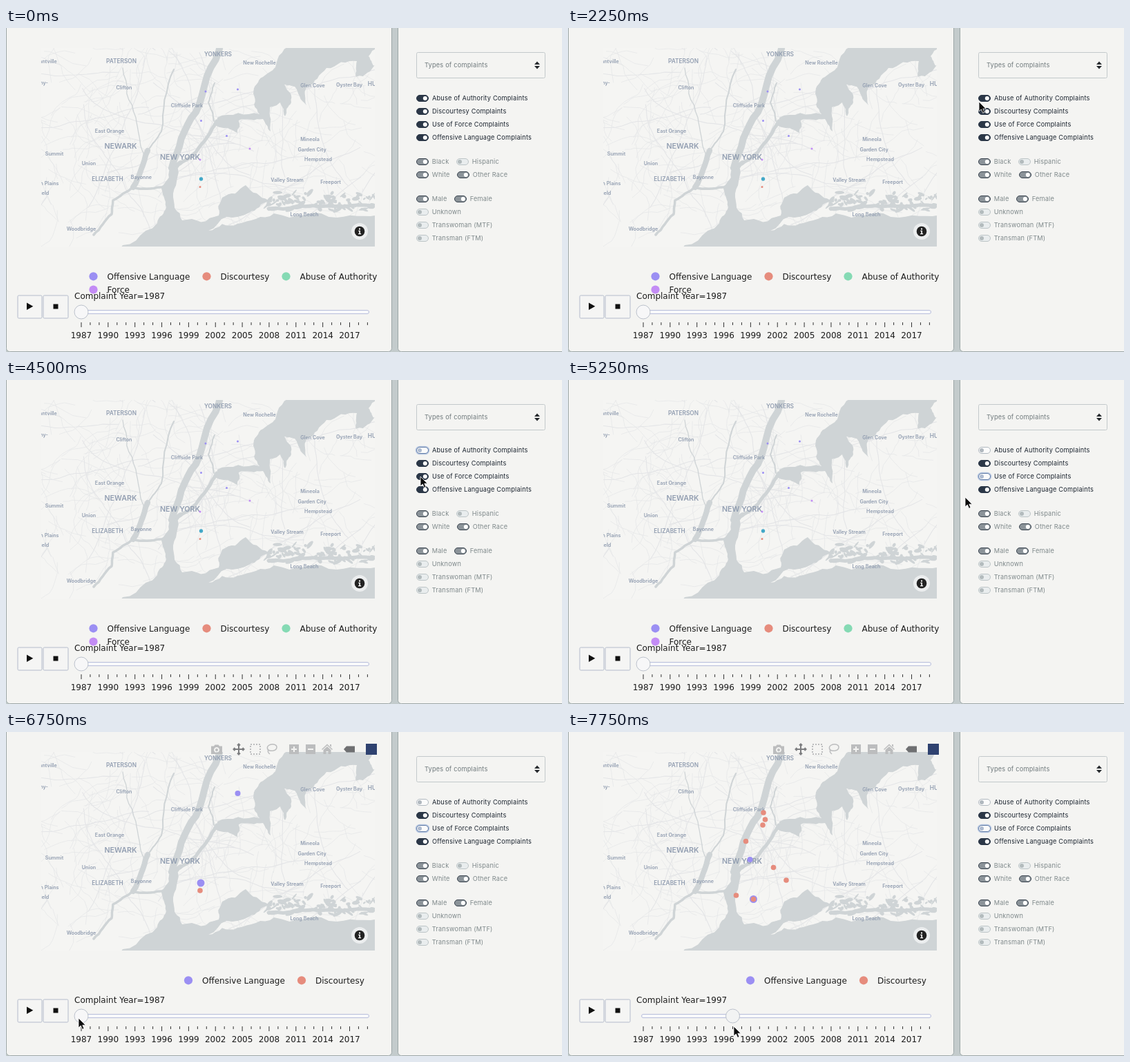
These frames come from a looping animation (805x470 px, 8000 ms). An HTML page:

```html
<!DOCTYPE html>
<html lang="en">
<head>
<meta charset="utf-8">
<title>Complaints by year</title>
<style>
  html, body { margin: 0; width: 100%; height: 100%; overflow: hidden; background: #c3cbcc; }
  svg { display: block; width: 805px; height: 470px; }
  .plot { font: 12px "DejaVu Sans", sans-serif; fill: #1c1c1c; }
  .form { font: 9.2px Inter, sans-serif; letter-spacing: .2px; }
  .places { font-family: Inter, sans-serif; font-weight: 600; fill: #929eb1; text-anchor: middle; }
  .water { fill: #cfd4d6; }
  .river { fill: none; stroke: #cfd4d6; stroke-linejoin: round; stroke-linecap: round; }
  .road { fill: none; stroke: #e4e5e7; }
</style>
</head>
<body>
<svg viewBox="0 0 805 470" xmlns="http://www.w3.org/2000/svg">
  <defs><clipPath id="mapClip"><rect x="51" y="29" width="483" height="288"/></clipPath></defs>
  <g fill="#f4f4f2" stroke="#9ca6a7">
    <rect x=".5" y="-9.5" width="558" height="479" rx="5"/>
    <rect x="567.5" y="-9.5" width="260" height="479" rx="5"/>
  </g>
  <g id="map" clip-path="url(#mapClip)"></g>
  <g id="controls"></g>
  <g id="live"></g>
</svg>
<script>
const $ = id => document.getElementById(id);

let seed = 11;
const random = () => (seed = (seed * 16807) % 2147483647) / 2147483647;
const between = (low, high) => low + random() * (high - low);
const repeat = (count, draw) => Array.from({ length: count }, (_, i) => draw(i)).join("");

const circle = (x, y, r, fill, extra = "") => `<circle cx="${x}" cy="${y}" r="${r}" fill="${fill}" ${extra}/>`;
const path = (d, attrs) => `<path d="${d}" ${attrs}/>`;
const text = (x, y, label, attrs = "") => `<text x="${x}" y="${y}" ${attrs}>${label}</text>`;

// ---------- map ----------
const OCEAN = `150,330 214,283 227,260 219,230 235,200 249,192 237,240 250,279 303,272 308,246
  342,228 375,250 347,268 288,294 330,284 383,269 474,275 550,262 550,330`;
const SOUND = `412,20 385,57 367,71 353,95 362,125 301,130 297,140 316,145 330,152 332,134 367,132 378,150
  377,115 392,108 399,128 408,108 398,82 413,85 430,112 430,86 459,58 503,48 502,71 512,70 528,55 520,41 550,20`;
const RIVERS = {
  "306,20 270,122 235,203": 10,
  "300,135 270,180 247,197": 5,
  "296,135 288,108 297,80": 2,
  "200,178 179,231": 8,
  "219,231 179,231 150,250 148,270 122,300": 3.5,
  "200,178 220,150 238,60": 2,
  "195,184 183,130 164,58": 1.3,
  "375,262 460,258 550,255": 5
};
const PLACES = [
  ["PATERSON", 167, 48], ["YONKERS", 307, 38], ["New Rochelle", 367, 51], ["antville", 61, 49],
  ["ny-", 55, 80], ["Clifton", 171, 87], ["Cliffside Park", 262, 113], ["Glen Cove", 444, 84],
  ["Oyster Bay", 497, 83], ["HU", 530, 81], ["East Orange", 150, 150], ["NEWARK", 166, 171],
  ["Mineola", 440, 162], ["Garden City", 443, 177], ["Hempstead", 452, 191], ["Summit", 70, 183],
  ["Union", 120, 197], ["NEW YORK", 252, 187], ["ELIZABETH", 147, 219], ["Bayonne", 196, 217],
  ["Valley Stream", 407, 221], ["Freeport", 470, 224], ["h Plains", 63, 226], ["ield", 56, 240],
  ["Woodbridge", 109, 292], ["Long Beach", 432, 271]
];

const parse = points => points.trim().split(/\s+/).map(pair => pair.split(",").map(Number));

// Midpoint displacement turns a few key points into a ragged shore.
function ragged(points, roughness) {
  const split = ([x0, y0], [x1, y1], depth) => {
    if (!depth) return `L${x1.toFixed(1)} ${y1.toFixed(1)}`;
    const shift = between(-roughness, roughness);
    const middle = [(x0 + x1) / 2 + (y1 - y0) * shift, (y0 + y1) / 2 - (x1 - x0) * shift];
    return split([x0, y0], middle, depth - 1) + split(middle, [x1, y1], depth - 1);
  };
  return "M" + points[0] + points.slice(1).map((point, i) => split(points[i], point, 3)).join("");
}

// A wandering line: each short stretch turns a little from the one before.
function road(stretches, turn) {
  let angle = between(0, Math.PI * 2);
  return `M${between(45, 535)} ${between(25, 290)}` + repeat(stretches, () => {
    angle += between(-turn, turn);
    const length = between(5, 16);
    return `l${(Math.cos(angle) * length).toFixed(1)} ${(Math.sin(angle) * length).toFixed(1)}`;
  });
}

function marshPool() {
  const x = between(370, 535), y = between(238, 264);
  return `<ellipse cx="${x}" cy="${y}" rx="${between(2, 7)}" ry="${between(1, 3)}" class="water"
    transform="rotate(${between(-60, 60)} ${x} ${y})"/>`;
}

function placeLabel([name, x, y]) {
  const size = name.startsWith("NEW") ? 10.7 : name === name.toUpperCase() ? 8.3 : 7.2;
  return text(x, y + size * .34, name, `font-size="${size}"`);
}

$("map").innerHTML =
  `<rect x="51" y="29" width="483" height="288" fill="#f5f5f3"/>` +
  path(repeat(260, () => road(6, .5)), `class="road" stroke-width=".7"`) +
  path(repeat(22, () => road(22, .25)), `class="road" stroke-width="1.1"`) +
  `<g transform="translate(5 0)">` +
  [OCEAN, SOUND].map(shore => path(ragged(parse(shore), .13), `class="water"`)).join("") +
  Object.entries(RIVERS).map(([course, width]) =>
    path(ragged(parse(course), .06), `class="river" stroke-width="${width}"`)).join("") +
  repeat(90, marshPool) + `</g>` +
  `<g class="places">${PLACES.map(placeLabel).join("")}</g>` +
  circle(512, 295, 12, "#fff", `opacity=".6"`) + circle(512, 295, 7.3, "#222") +
  path("M510.3 293.8h2.6v4.2h1.2v1.2h-4v-1.2h1.2v-3h-1zM511 290.4h2v2h-2z", `fill="#fff"`);

// ---------- fixed controls ----------
const FIRST_YEAR = 1987;
const yearX = year => 109 + (year - FIRST_YEAR) * 12.95;

const SWITCH = {
  on:          { fill: "#2b3747", border: "#2b3747", knob: "#fff", x: 12.8 },
  off:         { fill: "#fbfbfb", border: "#b0b8bf", knob: "#b0b8bf", x: 5 },
  turning:     { fill: "#b5c3db", border: "#8196b8", knob: "#e6e8e6", x: 8.5, halo: .5 },
  focused:     { fill: "#fbfbfb", border: "#5f7ba6", knob: "#aebbd0", x: 5, halo: 1 },
  disabledOn:  { fill: "#8b9399", border: "#3a444f", knob: "#fff", x: 12.8 },
  disabledOff: { fill: "#e9edee", border: "#bcc4c6", knob: "#b3bbbd", x: 5 }
};

function toggle(x, y, state) {
  const s = SWITCH[state];
  const pill = attrs => `<rect x="${x + .5}" y="${y - 4.5}" width="17" height="9" rx="4.5" ${attrs}/>`;
  return (s.halo ? pill(`fill="none" stroke="#b9c8e2" stroke-width="3.6" opacity="${s.halo}"`) : "") +
    pill(`fill="${s.fill}" stroke="${s.border}"`) + circle(x + s.x, y, 3, s.knob);
}

const rowY = row => 102 + row * 19;
const COMPLAINTS = ["Abuse of Authority", "Discourtesy", "Use of Force", "Offensive Language"];

const filter = (x, y, name, state) =>
  toggle(x, y, state) + text(x + 22.7, y + 3.3, name, `fill="#7f898b"`);
const FILTERS =
  filter(594, 194, "Black", "disabledOn") + filter(652, 194, "Hispanic", "disabledOff") +
  filter(594, 213, "White", "disabledOn") + filter(653, 213, "Other Race", "disabledOn") +
  filter(594, 248, "Male", "disabledOn") + filter(649, 248, "Female", "disabledOn") +
  ["Unknown", "Transwoman (MTF)", "Transman (FTM)"]
    .map((name, i) => filter(594, 267 + i * 19, name, "disabledOff")).join("");

const yearTick = i => {
  const x = yearX(FIRST_YEAR + i), major = i % 3 === 0;
  return path(`M${x} 427V${major ? 434 : 431}`, `stroke="#333"`) +
    (major ? text(x, 450.3, FIRST_YEAR + i, `text-anchor="middle"`) : "");
};

$("controls").innerHTML =
  `<g class="plot"><g fill="#f5f5f4" stroke="#b3bacb">
    <rect x="17" y="388" width="35" height="33" rx="1.5"/><rect x="54" y="388" width="36" height="33" rx="1.5"/></g>
    <path d="M30 398.5V409L39.3 403.7Z" fill="#111"/><rect x="68.5" y="400.5" width="7" height="7" fill="#111"/>
    <rect x="106.5" y="409.5" width="419" height="5" rx="2.5" fill="#f8f9fb" stroke="#b7bddb"/>
    ${repeat(33, yearTick)}</g>
  <g class="form">
    <rect x="594.5" y="35.5" width="186" height="37" rx="2" fill="#f4f4f2" stroke="#c3c9cb"/>
    ${text(606, 57.3, "Types of complaints", `fill="#6f797c"`)}
    <path d="M765 53L769 48.5 773 53ZM765 55L769 59.5 773 55Z" fill="#262a2e"/>
    ${COMPLAINTS.map((name, i) => text(617, rowY(i) + 3.2, name + " Complaints", `fill="#1c2530"`)).join("")}
    ${FILTERS}
  </g>`;

// ---------- legend and dots ----------
const COLOR = { offensive: "#9b8ff3", discourtesy: "#e68c7d", abuse: "#85dab4", force: "#c38cf5" };

const legendItem = (x, y, name, color) => circle(x, y, 6.1, color) + text(x + 20, y + 4.7, name);
const legendRow = x =>
  legendItem(x, 360.3, "Offensive Language", COLOR.offensive) +
  legendItem(x + 164, 360.3, "Discourtesy", COLOR.discourtesy);
const FULL_LEGEND = legendRow(126.5) +
  legendItem(405.5, 360.3, "Abuse of Authority", COLOR.abuse) + legendItem(126.5, 379.5, "Force", COLOR.force);
const SHORT_LEGEND = legendRow(264);

const dots = (points, r, color) => parse(points).map(([x, y]) => circle(x, y, r, color)).join("");
const ALL_DOTS =
  dots("289,92 335.5,89 282.5,134.5 319.5,156.5", 1.5, COLOR.offensive) +
  dots("353,175 281,191", 1.5, COLOR.force) +
  dots("282.5,219", 2.7, "#43a8c8") + dots("281,230.5", 1.5, COLOR.discourtesy);
const FIRST_DOTS =
  dots("335.5,89", 4, COLOR.offensive) + dots("282,219", 5.5, COLOR.offensive) +
  dots("281,230", 3.8, COLOR.discourtesy);
const LATER_SITES = "283,117 282,135 297.5,196.5 257.5,158.5 285.5,127 316,215 243.5,237 268.5,242.5".split(" ");

// Later years show more and more of the same sites.
function yearDots(year) {
  const age = year - FIRST_YEAR;
  if (!age) return FIRST_DOTS;
  const offensive = dots("263.5,185", 4, COLOR.offensive) + (age > 9 ? dots("268.5,242.5", 5.5, COLOR.offensive) : "");
  return offensive + dots(LATER_SITES.slice(0, age).join(" "), 3.8, COLOR.discourtesy);
}

// ---------- motion ----------
const clamp = u => Math.min(1, Math.max(0, u));
const easeOut = u => 1 - (1 - u) ** 3;

// Each glide runs from start to end time and stops at x, y.
const POINTER_START = { x: 704, y: 40 };
const GLIDES = [
  [1000, 2000, 595, 107], [2750, 3250, 599, 107], [4000, 4500, 600, 140],
  [5000, 5250, 575, 170], [5250, 5750, 266, 404], [5750, 6750, 105, 415]
];
const drag = t => clamp((t - 6750) / 1000) ** 1.7;

function pointer(t) {
  let { x, y } = POINTER_START;
  for (const [start, end, toX, toY] of GLIDES) {
    const u = easeOut(clamp((t - start) / (end - start)));
    x += (toX - x) * u;
    y += (toY - y) * u;
  }
  return `translate(${x + 135 * drag(t)} ${y + 12 * drag(t) ** .4})`;
}

function clicked(t, clickTime, blurTime) {
  if (t < clickTime) return "on";
  if (t < clickTime + 250) return "turning";
  return t < blurTime ? "focused" : "off";
}

const MODEBAR = `<g fill="#bcbdbe">
  <path fill-rule="evenodd" d="M297 20.5H301L302.5 18.5H307.5L309 20.5H313V32H297ZM305 22a4 4 0 1 0 .01 0ZM305 24a2 2 0 1 1-.01 0Z"/>
  <path d="M337 18V32M330 25H344M335 19.5L337 17.5 339 19.5M335 30.500L337 32.500 339 30.500M331.500 23L329.500 25 331.500 27M342.500 23L344.500 25 342.500 27"
    fill="none" stroke="#7d7e80" stroke-width="2"/>
  <rect x="354" y="18" width="14" height="14" fill="none" stroke="#bcbdbe" stroke-width="2" stroke-dasharray="2 2"/>
  <path d="M380 27C375 20 383 17 388 18S394 25 387 27Q382 28 380 26Q378 29 382 32" fill="none" stroke="#bcbdbe" stroke-width="1.5"/>
  <path fill-rule="evenodd" d="M410 18h14v14h-14zM416 21v3h-3v2h3v3h2v-3h3v-2h-3v-3z"/>
  <path fill-rule="evenodd" d="M434 18h14v14h-14zM437 24v2h8v-2z"/>
  <path d="M457 25L465 17.5 473 25 472 26 465 19.5 458 26ZM465 21L470.5 26V32H466.5V28H463.5V32H459.5V26ZM469 18h2v4l-2-2z"/>
  <path fill="#6f7072" d="M489 25L493 20.5H505V29.5H493Z"/>
  <rect x="521" y="17" width="16" height="16" fill="#2f4270"/></g>`;

function scene(t) {
  const filtered = t >= 6000;
  const year = FIRST_YEAR + Math.floor(10 * drag(t));
  const switches = [clicked(t, 4000, 4750), "on", clicked(t, 4750, LOOP), "on"];
  return (filtered ? yearDots(year) : ALL_DOTS) +
    `<g opacity="${clamp((t - 5250) / 500)}">${MODEBAR}</g>` +
    `<g class="plot">${filtered ? SHORT_LEGEND : FULL_LEGEND}${text(99, 393, "Complaint Year=" + year)}</g>` +
    circle(yearX(year), 412, 10, t >= 7000 ? "#f2f3f3" : "#f7f7f8", `stroke="#bcc2cc"`) +
    switches.map((state, i) => toggle(594, rowY(i), state)).join("") +
    (t >= 1000 ? path("M0 0V14L3.3 11 5.6 16.3 8 15.3 5.8 10.2H10.2Z",
      `transform="${pointer(t)}" fill="#0b0b0b" stroke="#fff" stroke-width=".8"`) : "");
}

// Everything on screen moves in quarter-second steps.
const LOOP = 8000, STEP = 250;
let shown = -1;
function render() {
  const t = Math.floor(performance.now() % LOOP / STEP) * STEP;
  if (t !== shown) $("live").innerHTML = scene(shown = t);
  requestAnimationFrame(render);
}
render();
</script>
</body>
</html>
```
